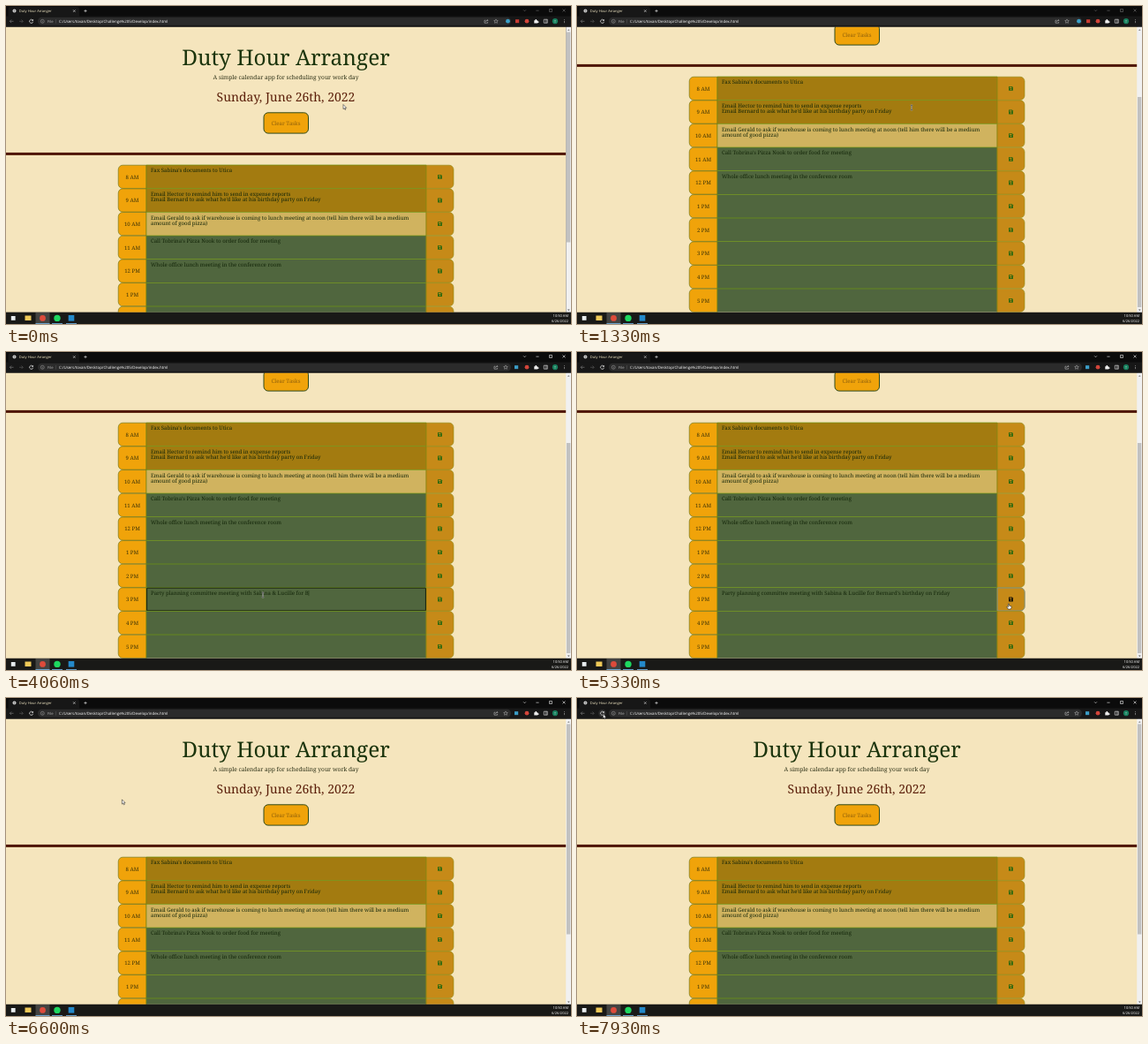
Recreate the animation shown at these times as an HTML page with a canvas. Size 640 by 360 pixels, loop 8 s.

```html
<!DOCTYPE html>
<html lang="en">
<head>
<meta charset="utf-8">
<title>Duty Hour Arranger</title>
<style>
html, body { margin: 0; width: 100%; height: 100%; overflow: hidden; background: #0b0b0b; }
canvas { display: block; width: 640px; height: 360px; }
</style>
</head>
<body>
<canvas id="stage" width="640" height="360"></canvas>
<script>
const ctx = document.getElementById('stage').getContext('2d');
const LOOP = 8000;
const SERIF = '"Noto Serif", serif';
const SANS = '"Open Sans", sans-serif';
const INK = '#14260a', ORANGE = '#f0a30a', CREAM = '#f5e5bd', BROWN = '#4f1603';
const FILLS = { past: '#a37b10', present: '#d0b35f', future: '#50663e' };
const ROW = 80 / 3, ROWS_TOP = 180, MAX_SCROLL = 100, PAGE_TOP = 23.4, PAGE_BOTTOM = 346.8;
const FOCUS = 2600, TYPE_START = 2850, TYPE_END = 4600, SAVE = 5250, RELOAD = 7450;
const NEW_TASK = "Party planning committee meeting with Sabina & Lucille for Bernard's birthday on Friday";

const rows = [
  ['8 AM', 'past', "Fax Sabina's documents to Utica"],
  ['9 AM', 'past', 'Email Hector to remind him to send in expense reports',
    "Email Bernard to ask what he'd like at his birthday party on Friday"],
  ['10 AM', 'present', 'Email Gerald to ask if warehouse is coming to lunch meeting at noon (tell him there will be a medium',
    'amount of good pizza)'],
  ['11 AM', 'future', "Call Tobrina's Pizza Nook to order food for meeting"],
  ['12 PM', 'future', 'Whole office lunch meeting in the conference room'],
  ['1 PM', 'future'], ['2 PM', 'future'], ['3 PM', 'future'], ['4 PM', 'future'], ['5 PM', 'future'],
];
const EDITED = 7, TASK_SIZE = 6.05;

// Pointer stops: time, x, y, shape used from that time on
const pointer = [
  [0, 382, 111.5, 'arrow'], [800, 379, 115, 'beam'], [1700, 379, 115, 'beam'],
  [2450, 291, 275, 'beam'], [4650, 291, 275, 'beam'], [5080, 480, 284, 'hand'],
  [5250, 489, 285, 'hand'], [5520, 489, 285, 'hand'], [5600, 470, 275, 'beam'],
  [6250, 141, 124, 'beam'], [6480, 141, 124, 'arrow'], [7150, 29.5, 18, 'arrow'], [LOOP, 29.5, 18, 'arrow'],
];

const smooth = (t, a, b) => {
  const p = Math.min(1, Math.max(0, (t - a) / (b - a)));
  return p * p * (3 - 2 * p);
};

const scrollAt = t => MAX_SCROLL * (smooth(t, 480, 1050) - smooth(t, 6063, 6583));

function pointerAt(t) {
  const i = pointer.findIndex((stop, n) => n && t < stop[0]) - 1;
  const [t0, x0, y0, shape] = pointer[i], [t1, x1, y1] = pointer[i + 1];
  const p = smooth(t, t0, t1);
  return { x: x0 + (x1 - x0) * p, y: y0 + (y1 - y0) * p, shape };
}

function text(str, x, y, size, color, font = SERIF, align = 'left') {
  ctx.font = `${size}px ${font}`;
  ctx.textAlign = align;
  ctx.fillStyle = color;
  ctx.fillText(str, x, y);
}

function rect(x, y, w, h, color) {
  ctx.fillStyle = color;
  ctx.fillRect(x, y, w, h);
}

function box(x, y, w, h, radii, fill, stroke, width = 0.6) {
  ctx.beginPath();
  ctx.roundRect(x, y, w, h, radii);
  if (fill) { ctx.fillStyle = fill; ctx.fill(); }
  if (stroke) { ctx.strokeStyle = stroke; ctx.lineWidth = width; ctx.stroke(); }
}

function disc(x, y, r, color) {
  ctx.beginPath();
  ctx.arc(x, y, r, 0, 7);
  ctx.fillStyle = color;
  ctx.fill();
}

function path(d, x, y, stroke, width = 0.7, fill) {
  const shape = new Path2D(d);
  ctx.save();
  ctx.translate(x, y);
  if (fill) { ctx.fillStyle = fill; ctx.fill(shape); }
  if (stroke) { ctx.strokeStyle = stroke; ctx.lineWidth = width; ctx.stroke(shape); }
  ctx.restore();
}

function saveIcon(x, y, color) {
  path('M-2.4-2.4H1.4L2.4-1.4V2.4H-2.4Z', x, y, null, 0, color);
  rect(x - 1.5, y - 1.6, 2.5, 1.1, '#c68a18');
  disc(x, y + 0.9, 0.75, '#c68a18');
}

function drawRow(row, index, t, hovering) {
  const [hour, tense, ...lines] = row;
  const y = ROWS_TOP + index * ROW, mid = y + ROW / 2;
  const edited = index === EDITED;
  box(127.2, y + 0.2, 31.8, ROW - 0.4, [5, 0, 0, 5], ORANGE, '#5d6f16');
  rect(159, y, 317, ROW, FILLS[tense]);
  box(476, y + 0.2, 31, ROW - 0.4, [0, 5, 5, 0], '#c68a18', '#8d8a14');
  rect(159, y - 0.35, 317, 0.7, '#6b9412');
  rect(158.7, y, 0.6, ROW, '#6b8412');
  rect(475.6, y, 0.6, ROW, '#8b8414');
  text(hour, 143, mid + 2.3, 6, '#3c3308', SERIF, 'center');
  saveIcon(491.5, mid, edited && hovering ? '#0c0c08' : '#28680f');

  if (edited && t >= FOCUS && t < RELOAD) {
    const typed = Math.min(1, Math.max(0, (t - TYPE_START) / (TYPE_END - TYPE_START)));
    lines[0] = NEW_TASK.slice(0, Math.round(typed * NEW_TASK.length));
    if (t < SAVE) {
      box(159.6, y + 0.5, 315.8, ROW - 1, 0.5, null, '#17200f', 1);
      ctx.font = `${TASK_SIZE}px ${SERIF}`;
      ctx.textAlign = 'left';
      const blinkOn = (typed > 0 && typed < 1) || (t - FOCUS) % 1000 < 500;
      if (blinkOn) rect(164 + ctx.measureText(lines[0]).width, y + 3.4, 0.5, 6, INK);
    } else {
      box(476.2, y + 0.4, 31, ROW - 0.8, [0, 5, 5, 0], null, '#8b948c', 0.9);
    }
  }
  lines.forEach((line, n) => text(line, 164, y + 8.4 + n * 6, TASK_SIZE, INK));
}

function drawPage(t, scroll, hovering) {
  rect(0, PAGE_TOP, 634.4, PAGE_BOTTOM - PAGE_TOP, CREAM);
  ctx.save();
  ctx.beginPath();
  ctx.rect(0, PAGE_TOP, 634.4, PAGE_BOTTOM - PAGE_TOP);
  ctx.clip();
  ctx.translate(0, -scroll);
  text('Duty Hour Arranger', 317, 67.2, 24.4, '#1b340c', SERIF, 'center');
  text('A simple calendar app for scheduling your work day', 317, 83.3, 6.6, '#2c3016', SERIF, 'center');
  text('Sunday, June 26th, 2022', 317, 107.7, 13.95, '#5a1e09', SERIF, 'center');
  box(292, 120.8, 50.5, 23.3, 5, ORANGE, '#2f4b1b', 1);
  text('Clear Tasks', 317, 134.6, 6.1, '#8f600c', SERIF, 'center');
  rect(0, 165.9, 640, 3, BROWN);
  rows.forEach((row, i) => drawRow(row, i, t, hovering));
  ctx.restore();

  rect(634.4, PAGE_TOP, 5.6, PAGE_BOTTOM - PAGE_TOP, '#f1f1f1');
  rect(635, 29.5 + scroll * 0.735, 4.3, 238, '#c1c1c1');
  path('M-1.3.8L0-.8L1.3.8Z', 637.3, 27, null, 0, '#777');
  path('M-1.3-.8L0 .8L1.3-.8Z', 637.3, 344.3, null, 0, '#555');
}

function drawBrowser(focused, reloadHover) {
  rect(0, 0, 640, PAGE_TOP, '#0b0b0b');
  box(2.5, 1, 80.5, 14, [3, 3, 0, 0], '#171717');
  rect(0, 11.5, 640, PAGE_TOP - 11.5, '#171717');
  const light = '#f0f0f0', control = focused ? light : '#707070';
  disc(9.5, 5.6, 2, '#dcdcdc');
  path('M-1.8 0H1.8M0-1.8V1.8', 9.5, 5.6, '#555', 0.4);
  text('Duty Hour Arranger', 14.8, 7.2, 4, '#f6ecc8', SANS);
  path('M-1.2-1.2L1.2 1.2M1.2-1.2L-1.2 1.2', 77.3, 5.6, light, 0.6);
  path('M-1.6 0H1.6M0-1.6V1.6', 90, 5.6, light, 0.6);
  path('M-1.4-.6L0 .8L1.4-.6', 587.5, 5, control, 0.6);
  path('M-1.6 0H1.6', 602, 5.2, control, 0.6);
  path('M-1.5-1.5H1.5V1.5H-1.5Z', 617, 5, control, 0.6);
  path('M-1.5-1.5L1.5 1.5M1.5-1.5L-1.5 1.5', 632, 5, control, 0.6);

  box(36, 12.8, 536, 9, 4.5, '#2b2b2b');
  path('M2.2 0H-2M-.2-1.8L-2 0L-.2 1.8', 6.3, 17.3, '#777');
  path('M-2.2 0H2M.2-1.8L2 0L.2 1.8', 17.3, 17.3, '#555');
  if (reloadHover) disc(28.6, 17.3, 4.4, '#2b2b2b');
  path('M1.6-1.2A2 2 0 1 0 2 .5M2-2.2V-.7H.5', 28.6, 17.3, light);
  path('M2 0A2 2 0 1 1-2 0A2 2 0 1 1 2 0M0-.3V1.1M0-1.1V-.8', 41.3, 17.3, '#aaa', 0.5);
  text('File', 47, 18.8, 4.2, '#b4b4b4', SANS);
  rect(56.5, 15, 0.4, 4.6, '#666');
  text('C:/Users/tovan/Desktop/Challenge%205/Develop/index.html', 60, 18.8, 4.4, '#fff', SANS);

  const shift = focused ? 0 : -11;
  path('M-.7-1H-2V2H1.6V.8M-.7 .6Q-.5-1 2-1M1-2L2-1L1 0', 555 + shift, 17.2, '#bbb', 0.6);
  path('M0-2.3L.7-.8L2.3-.6L1.1.5L1.4 2.1L0 1.3L-1.4 2.1L-1.1.5L-2.3-.6L-.7-.8Z', 566 + shift, 17.2, '#bbb', 0.5);
  if (!focused) disc(568.5, 17.2, 2.4, '#3aa0c8');
  rect(focused ? 576 : 577, 15.2, 4.2, 4, focused ? '#3b9cc6' : '#c83c32');
  disc(590, 17.2, 2.4, '#d3453a');
  path('M-2-1.2H-.7A.8.8 0 1 1 .7-1.2H2V.1A.8.8 0 1 1 2 1.4V2.2H-2Z', 600.3, 17.4, null, 0, light);
  path('M-2-2H2V2H-2ZM.5-2V2', 611.3, 17.2, light, 0.6);
  disc(622, 17.2, 3.1, '#18805e');
  text('T', 622, 18.5, 3.6, '#fff', SANS, 'center');
  [-1.6, 0, 1.6].forEach(dy => disc(632.5, 17.2 + dy, 0.45, light));
}

function drawTaskbar() {
  rect(0, PAGE_BOTTOM, 640, 360 - PAGE_BOTTOM, '#191917');
  rect(33.5, 347, 16, 13, '#434341');
  rect(5.8, 351, 4.8, 4.8, '#e8ecee');
  rect(21.5, 350.5, 7, 5.5, '#f0c958');
  disc(41.5, 353.4, 3.4, '#dd4b3b');
  disc(58, 353.4, 3.7, '#1ed760');
  rect(70.7, 350, 6.6, 6.6, '#2489ca');
  [[33.5, 16], [52, 12], [68, 12]].forEach(([x, w]) => rect(x, 359.2, w, 0.8, '#76b9ed'));
  text('10:50 AM', 637, 351.9, 4, '#fff', SANS, 'right');
  text('6/26/2022', 637, 358, 4, '#fff', SANS, 'right');
}

function drawPointer({ x, y, shape }) {
  if (shape === 'arrow') {
    path('M0 0V5.2L1.2 4.1L2 6L2.9 5.6L2.1 3.8H3.7Z', x, y, '#111', 0.5, '#fff');
  } else if (shape === 'hand') {
    path('M-.6 0Q0-.6.5 0V2.2L3 2.8V4.4L2.3 6H-.7L-2.2 3.6L-1.6 3L-.6 3.9Z', x, y, '#111', 0.5, '#fff');
  } else {
    const beam = 'M-1.2-2.7H1.2M0-2.7V2.7M-1.2 2.7H1.2';
    path(beam, x, y, '#eee', 1.1);
    path(beam, x, y, '#151515', 0.6);
  }
}

function draw(now) {
  const t = now % LOOP;
  const mouse = pointerAt(t);
  ctx.textRendering = 'geometricPrecision';
  drawPage(t, scrollAt(t), mouse.shape === 'hand');
  drawBrowser(t >= FOCUS, mouse.x < 33 && mouse.y < 24);
  drawTaskbar();
  drawPointer(mouse);
  requestAnimationFrame(draw);
}
requestAnimationFrame(draw);
</script>
</body>
</html>
```
